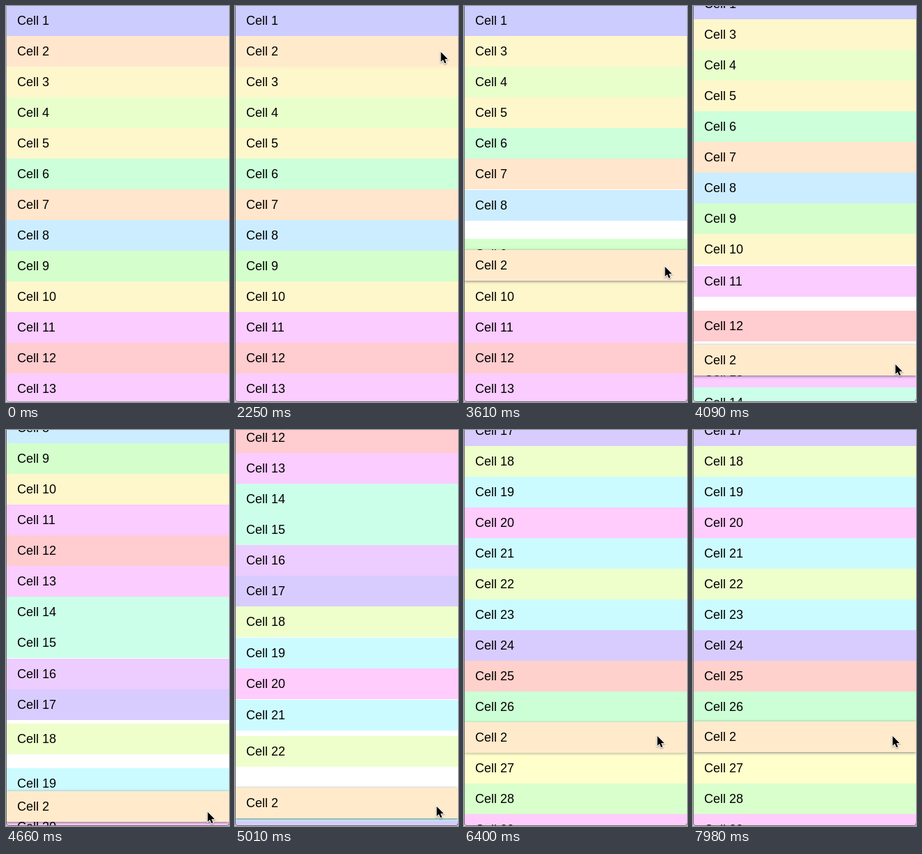
Animation of 320x568 px, one loop 8000 ms. Source, as an HTML page with a canvas:

```html
<!DOCTYPE html>
<html>
<head>
<meta charset="utf-8">
<title>Reordering cells</title>
<style>
html, body { margin: 0; width: 100%; height: 100%; overflow: hidden; background: #fff; }
canvas { display: block; }
</style>
</head>
<body>
<canvas id="stage" width="320" height="568"></canvas>
<script>
const ctx = document.getElementById('stage').getContext('2d');
const W = 320, H = 568, ROW = 44, LOOP = 8000;
const DRAGGED = 1;                        // index of the cell that is moved
const DRAG_START = 2900, DRAG_END = 6300;
const REACTION = 30, SETTLE = 59;         // how rows make room, in ms

const pastel = hue => `hsl(${hue}, 100%, 90%)`;
const hues = [240, 30, 50, 87, 50, 136, 30, 201, 110, 50, 294, 357, 294, 155, 155,
  279, 254, 80, 185, 304, 185, 80, 185, 254, 6, 130, 60, 105, 304];

// Key poses: time, pointer x, pointer y, centre of the dragged cell.
const poses = [
  [960, 305, 76, 65],
  [1150, 295, 65, 65],
  [2900, 295, 65, 65],
  [3380, 290, 324, 323],
  [3610, 288, 373, 371.4],
  [4090, 290, 513, 508],
  [4250, 290, 540, 535],
  [4660, 289, 547, 540],
  [5420, 289, 515, 520],
  [5600, 285, 461, 465],
  [5970, 277, 438, 442],
  [6810, 277, 438, 441],
  [6980, 286, 438, 441],
  [7850, 286, 438, 441],
  [7980, 286, 438, 440]
];

// Monotone cubic curve through one column of the key poses.
function track(column) {
  const points = poses.map(pose => [pose[0], pose[column]]);
  const last = points.length - 1;
  const secant = i => (points[i + 1][1] - points[i][1]) / (points[i + 1][0] - points[i][0]);
  const slopes = points.map((_, i) => {
    if (i === 0 || i === last) return 0;
    const a = secant(i - 1), b = secant(i);
    return a * b <= 0 ? 0 : 2 * a * b / (a + b);
  });
  return t => {
    if (t <= points[0][0]) return points[0][1];
    if (t >= points[last][0]) return points[last][1];
    const i = points.findIndex(p => p[0] > t) - 1;
    const [t0, v0] = points[i], [t1, v1] = points[i + 1];
    const d = t1 - t0, u = (t - t0) / d, w = 1 - u;
    return v0 * (1 + 2 * u) * w * w + slopes[i] * d * u * w * w
      + v1 * u * u * (3 - 2 * u) - slopes[i + 1] * d * u * u * w;
  };
}

const pointerX = track(1), pointerY = track(2), dragY = track(3);
const clamp = (v, low, high) => Math.min(high, Math.max(low, v));
const ramp = (t, from, to) => clamp((t - from) / (to - from), 0, 1);
const scroll = t => clamp((t - 4039) * 0.4625, 0, 680);
const lift = t => ramp(t, 2240, 2420) - ramp(t, 6300, 6570) + ramp(t, 7840, 7980);
const settle = age => age > 0 ? 1 - Math.exp(-age / SETTLE) : 0;

// When each row starts to make room, and when it starts to go back.
const moves = hues.map((_, i) => {
  let away = Infinity, back = Infinity;
  for (let t = DRAG_START; i > DRAGGED && t < DRAG_END; t++) {
    const passed = dragY(t) + scroll(t) >= ROW * i + 7;
    if (passed) away = Math.min(away, t + REACTION);
    else if (away < t) back = Math.min(back, t + REACTION);
  }
  return { away, back };
});

function rowTop(i, t) {
  const { away, back } = moves[i];
  const shift = ROW * (settle(t - away) - settle(t - back));
  return Math.round(ROW * i - 1 - shift - scroll(t));
}

function drawCell(i, top, fill) {
  ctx.fillStyle = fill;
  ctx.fillRect(0, top, W, ROW);
  ctx.shadowColor = 'transparent';
  ctx.fillStyle = '#000';
  ctx.fillText('Cell ' + (i + 1), 16, top + 28);
}

function drawDragged(t) {
  const pressed = (t >= 1890 && t < 6570) || t >= 7520;
  ctx.save();
  ctx.shadowColor = `rgba(0, 0, 0, ${0.5 * lift(t)})`;
  ctx.shadowBlur = 4;
  ctx.shadowOffsetY = 0.5;
  drawCell(DRAGGED, Math.round(dragY(t)) - ROW / 2, pastel(pressed ? 37 : hues[DRAGGED]));
  ctx.restore();
}

function drawFrame(active) {
  ctx.strokeStyle = active ? '#6a6a6a' : '#a4a4a4';
  ctx.lineWidth = 1;
  ctx.beginPath();
  ctx.moveTo(0.5, 0);
  ctx.lineTo(0.5, H - 4);
  ctx.quadraticCurveTo(0.5, H - 0.5, 4, H - 0.5);
  ctx.lineTo(W - 3, H - 0.5);
  ctx.quadraticCurveTo(W, H - 0.5, W, H - 4);
  ctx.stroke();
}

const arrow = new Path2D('M0 0V14L3.1 11.1L5.4 16.2L7.6 15.2L5.4 10.3L9.8 10Z');

function drawPointer(x, y) {
  ctx.save();
  ctx.translate(x + 0.5, y + 1);
  ctx.lineWidth = 2;
  ctx.strokeStyle = '#fff';
  ctx.shadowColor = 'rgba(0, 0, 0, 0.4)';
  ctx.shadowBlur = 2;
  ctx.shadowOffsetY = 1;
  ctx.stroke(arrow);
  ctx.shadowColor = 'transparent';
  ctx.fillStyle = '#000';
  ctx.fill(arrow);
  ctx.restore();
}

function draw(t) {
  ctx.fillStyle = '#fff';
  ctx.fillRect(0, 0, W, H);
  ctx.font = '18px "Liberation Sans", Arial, sans-serif';
  hues.forEach((hue, i) => {
    if (i !== DRAGGED) drawCell(i, rowTop(i, t), pastel(hue));
  });
  drawDragged(t);
  drawFrame(t >= 1750);
  if (t >= 960) drawPointer(Math.round(pointerX(t)), Math.round(pointerY(t)));
}

const start = performance.now();
function tick() {
  draw((performance.now() - start) % LOOP);
  requestAnimationFrame(tick);
}
tick();
</script>
</body>
</html>
```
